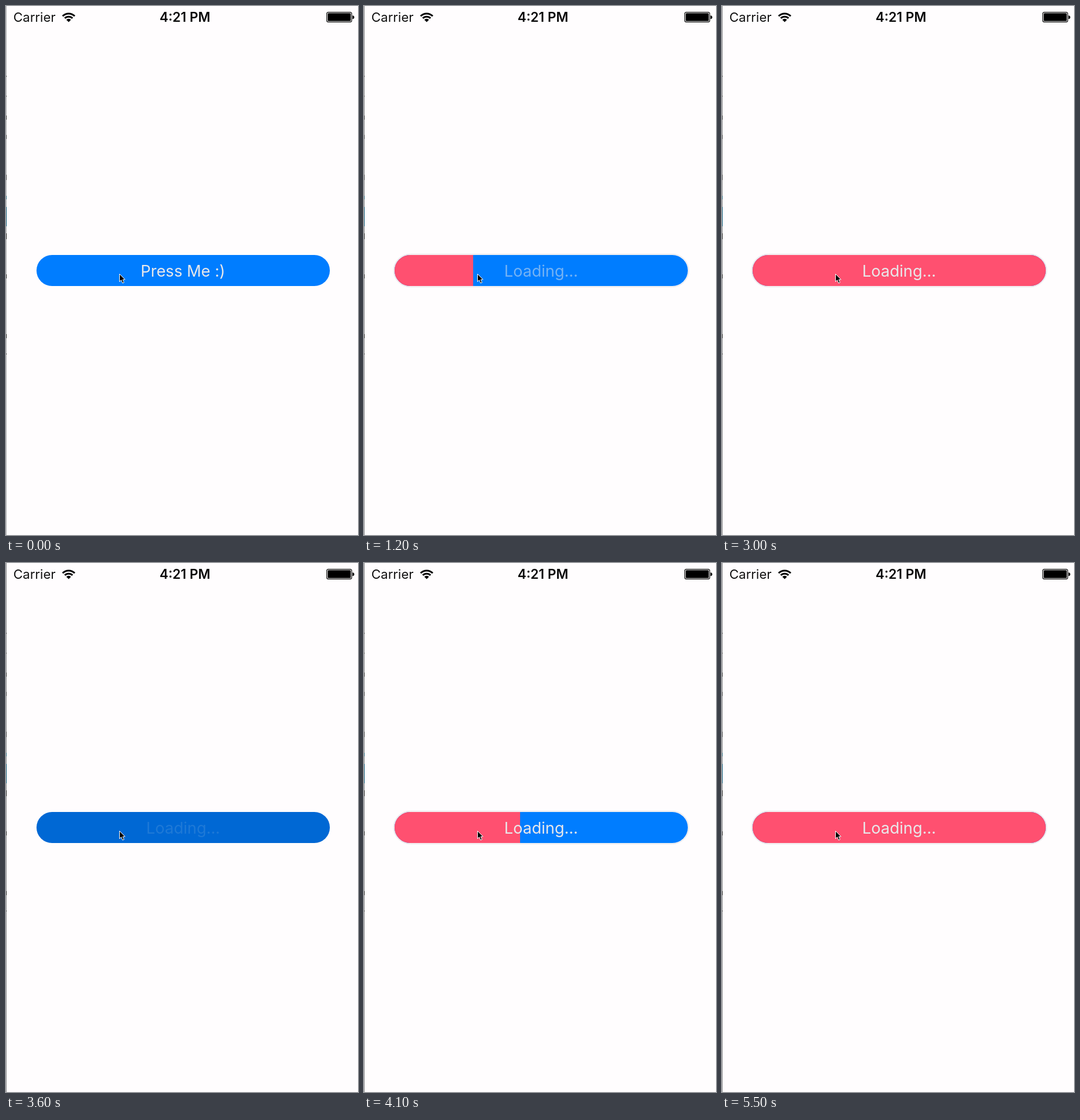
Write an HTML page that moves like this. It is 600 px wide and 903 px high and loops after 5.6 s.

```html
<!DOCTYPE html>
<html lang="en">
<head>
<meta charset="utf-8">
<title>Loading button</title>
<style>
  html, body { margin: 0; width: 100%; height: 100%; overflow: hidden; background: #fffdfe; }
  svg { display: block; width: 600px; height: 903px; font-family: Inter, Roboto, sans-serif; }
  .label { font-size: 27px; fill: #e8e8ea; }
</style>
</head>
<body>
<svg viewBox="0 0 600 903">
  <defs>
    <clipPath id="pill"><rect x="52" y="425" width="500" height="53" rx="26.5"/></clipPath>
  </defs>
  <rect width="600" height="903" fill="#fffdfe"/>

  <rect id="edge" width="1" height="903"/>
  <g id="marks"></g>

  <text x="12.5" y="27" font-size="22" fill="#111">Carrier</text>
  <g fill="none" stroke="#080808" stroke-width="3">
    <path d="M96.5 17.2A14.5 14.5 0 0 1 117.1 17.2"/>
    <path d="M100.2 20.9A9.3 9.3 0 0 1 113.4 20.9"/>
    <path d="M106.8 27.4L102.8 23.4A5.6 5.6 0 0 1 110.8 23.4Z" fill="#080808" stroke="none"/>
  </g>
  <text x="305" y="27" font-size="22.5" font-weight="600" text-anchor="middle" fill="#080808">4:21 PM</text>
  <rect x="546.6" y="10.6" width="42.8" height="16.8" rx="3" fill="none" stroke="#080808" stroke-width="1.1"/>
  <rect x="548.3" y="12.2" width="39.4" height="13.6" rx="1.5" fill="#000"/>
  <path d="M590.6 16.2a3 3 0 0 1 0 6z" fill="#080808"/>

  <rect id="ring" x="50.5" y="423.5" width="503" height="56" rx="28" fill="none" stroke="#e2e0e2"/>
  <g clip-path="url(#pill)">
    <rect id="base" x="52" y="425" width="500" height="53"/>
    <rect id="fill" x="52" y="425" height="53" fill="#ff5070"/>
  </g>
  <text id="idle" class="label" x="301.5" y="462" text-anchor="middle">Press Me :)</text>
  <text id="busy" class="label" x="302" y="462" text-anchor="middle">Loading...</text>

  <path d="M193.5 457.5V470.5L196.5 467.8L198.7 473L201.2 472L199 467H203Z"
        fill="#000" stroke="#fff" stroke-width="1"/>
</svg>
<script>
const LOOP = 5600, STEP = 100, WIDTH = 500;
const $ = id => document.getElementById(id);
const [edge, ring, base, fill, idle, busy] =
  ["edge", "ring", "base", "fill", "idle", "busy"].map($);

// Slivers of the window behind: y, height, colour
const marks = [
  [119, 2, "#444"], [153, 2, "#555"], [187, 7, "#333"], [220, 7, "#444"],
  [288, 9, "#444"], [324, 6, "#2c6b80"], [343, 33, "#0d5878"], [388, 10, "#222"],
  [458, 7, "#222"], [560, 7, "#222"], [593, 2, "#444"]
];
$("marks").innerHTML = marks.map(([y, h, c]) =>
  `<rect y="${y}" width="1" height="${h}" fill="${c}"/>`).join("");

const runs = [
  { press: 650, start: 934, dur: 992, reset: 3100 },
  { press: 3380, start: 3665, dur: 1016, reset: LOOP }
];
// Label opacity relative to the start of the fill: ms, value
const idleOut = [[-300, 1], [-120, 0]];
const busyIn = [[-120, 0], [-65, 0.13], [266, 0.5], [435, 1]];

const clamp = v => Math.min(1, Math.max(0, v));

function sample(keys, t) {
  if (t <= keys[0][0]) return keys[0][1];
  for (let i = 1; i < keys.length; i++) {
    const [t0, v0] = keys[i - 1], [t1, v1] = keys[i];
    if (t < t1) return v0 + (v1 - v0) * (t - t0) / (t1 - t0);
  }
  return keys[keys.length - 1][1];
}

function draw(t) {
  const run = runs.find(r => t >= r.press && t < r.reset);
  const dt = run ? t - run.start : 0;
  const filling = run && dt >= 0;
  const back = t >= runs[0].reset ? clamp((t - runs[0].reset + 100) / 200) : 1;

  edge.setAttribute("fill", t < runs[0].press ? "#b0b0b2" : "#8c8c8e");
  ring.setAttribute("opacity", filling ? 1 : 0);
  base.setAttribute("fill", run && !filling ? "#0068d4" : "#007dff");
  fill.setAttribute("width", filling ? WIDTH * clamp(dt / run.dur) : 0);
  idle.setAttribute("opacity", run ? sample(idleOut, dt) : back);
  busy.setAttribute("opacity", run ? sample(busyIn, dt) : 1 - back);
}

function tick() {
  const t = performance.now() % LOOP;
  draw(Math.floor(t / STEP) * STEP);
  requestAnimationFrame(tick);
}
tick();
</script>
</body>
</html>
```
